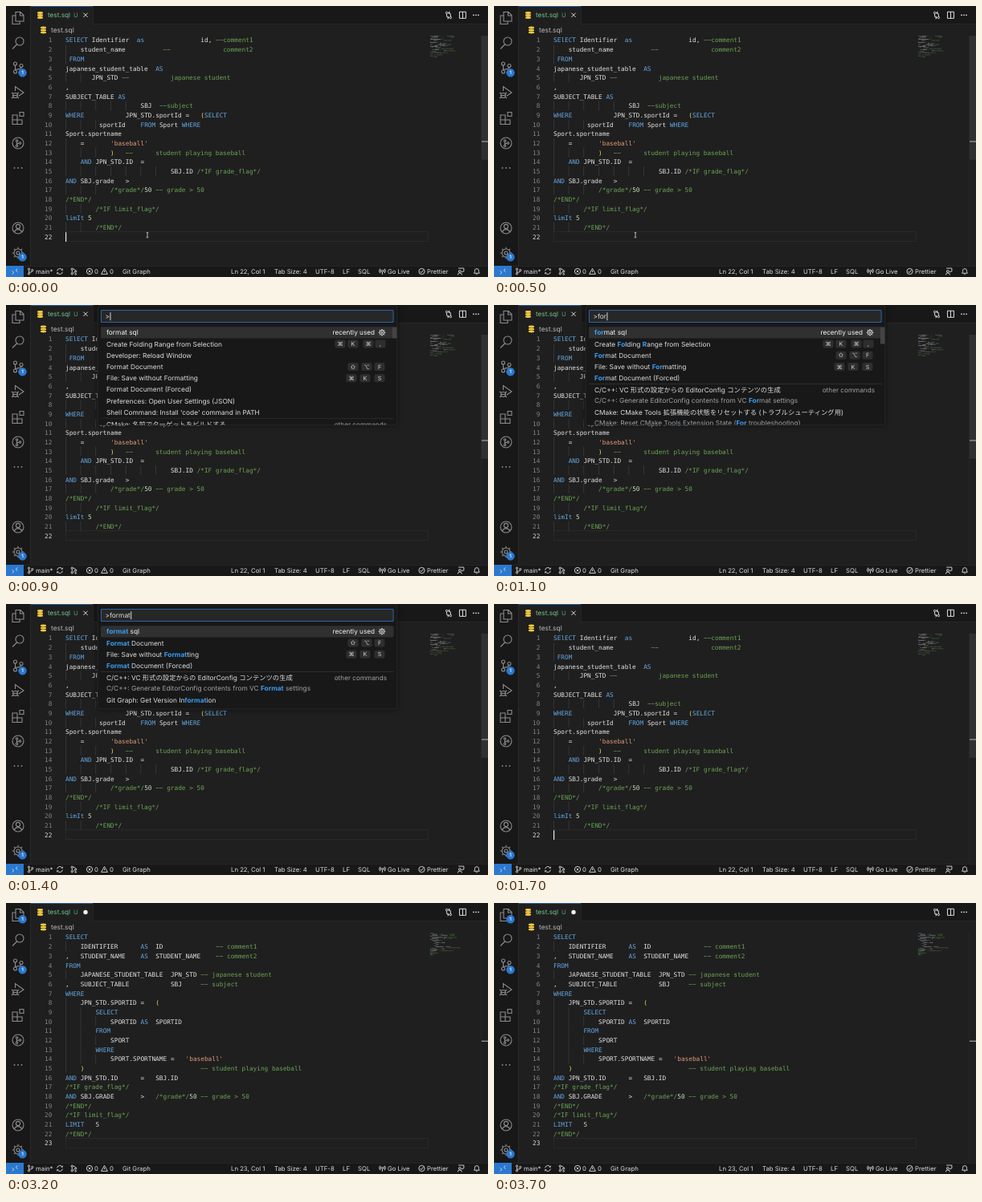
An HTML page with a canvas for the animation above (3.9 s loop, 600 by 338 pixels).

```html
<!DOCTYPE html>
<html lang="en">
<head>
<meta charset="utf-8">
<title>SQL formatter</title>
<style>
html, body { margin: 0; width: 100%; height: 100%; overflow: hidden; background: #181818; }
canvas { display: block; width: 600px; height: 338px; }
</style>
</head>
<body>
<canvas id="stage"></canvas>
<script>
const LOOP = 3900;
const UI = 'Inter, "Noto Sans CJK JP", "DejaVu Sans", sans-serif';
const MONO = '"DejaVu Sans Mono", monospace';
const COLOR = {
  bar: '#181818', editor: '#1f1f1f', line: '#2a2a2a', panel: '#181818', blue: '#2a78d0',
  text: '#dcdcdc', dim: '#8c8c8c', plain: '#e2e2e2', comment: '#6ca356', string: '#e09a78',
  keyword: '#64a8e2', bracket: '#f4d648', number: '#c8dcbc', match: '#3a9cf0',
  git: '#74c490', yellow: '#f0c840'
};
const CHAR = 4.675, ROW = 11.67, LEFT = 74, TOP = 42.7;

// "@n" moves to column n.
const expand = line => line.split(/ ?@/).reduce((out, part) => {
  const [, column, text] = part.match(/^(\d+) (.*)$/);
  return out.padEnd(+column) + text;
});
const parse = source => source.trim().split('\n').map(expand).concat('');

const messy = parse(`
SElECT Identifier @19 as @36 id, @40 --comment1
@4 student_name @26 --@42 comment2
@1 FROM
japanese_student_table @24 AS
@7 JPN_STD @15 --@28 japanese student
,
SUBJECT_TABLE AS
@20 SBJ @25 --subject
WHERE @16 JPN_STD.sportId = @36 (SELECT
@9 sportId @20 FROM Sport WHERE
Sport.sportname
@4 = @12 'baseball'
@12 ) @16 --@24 student playing baseball
@4 AND JPN_STD.ID @20 =
@28 SBJ.ID /*IF grade_flag*/
AND SBJ.grade @16 >
@12 /*grade*/50 -- grade > 50
/*END*/
@8 /*IF limit_flag*/
limIt 5
@8 /*END*/
`);

const tidy = parse(`
SELECT
@4 IDENTIFIER @20 AS @24 ID @40 -- comment1
, @4 STUDENT_NAME @20 AS @24 STUDENT_NAME @40 -- comment2
FROM
@4 JAPANESE_STUDENT_TABLE @28 JPN_STD @36 -- japanese student
, @4 SUBJECT_TABLE @28 SBJ @36 -- subject
WHERE
@4 JPN_STD.SPORTID @20 = @24 (
@8 SELECT
@12 SPORTID @20 AS @24 SPORTID
@8 FROM
@12 SPORT
@8 WHERE
@12 SPORT.SPORTNAME @28 = @32 'baseball'
@4 ) @36 -- student playing baseball
AND JPN_STD.ID @20 = @24 SBJ.ID
/*IF grade_flag*/
AND SBJ.GRADE @20 > @24 /*grade*/50 -- grade > 50
/*END*/
/*IF limit_flag*/
LIMIT @8 5
/*END*/
`);

const TOKEN = /(?<comment>--.*|\/\*.*?\*\/)|(?<string>'.*?')|(?<keyword>\b(?:select|as|from|where|and|limit)\b)|(?<bracket>[()])|(?<number>\b\d+)|(?<plain>[\w.]+|\S)/gi;
const tokens = line => [...line.matchAll(TOKEN)].map(m => ({
  text: m[0], column: m.index,
  color: COLOR[Object.keys(m.groups).find(kind => m.groups[kind])]
}));

const canvas = document.getElementById('stage');
const ctx = canvas.getContext('2d');
const ratio = window.devicePixelRatio || 1;
canvas.width = 600 * ratio;
canvas.height = 338 * ratio;

function rect(x, y, w, h, color, radius = 0) {
  ctx.fillStyle = color;
  ctx.beginPath();
  ctx.roundRect(x, y, w, h, radius);
  ctx.fill();
}

// Vertically centred on the capitals; returns the width.
function write(text, x, y, color = COLOR.text, size = 8.2, { font = UI, weight = 400, align = 'left' } = {}) {
  ctx.font = `${weight} ${size}px ${font}`;
  ctx.textAlign = align;
  ctx.fillStyle = color;
  ctx.fillText(text, x, y + size * .36);
  return ctx.measureText(text).width;
}

const ring = (x, y, r) => `M${x + r} ${y}a${r} ${r} 0 1 1 ${-2 * r} 0a${r} ${r} 0 1 1 ${2 * r} 0`;
const spokes = Array.from({ length: 8 }, (_, i) => {
  const c = Math.cos(i * Math.PI / 4), s = Math.sin(i * Math.PI / 4);
  return `M${5 * c} ${5 * s}L${7.2 * c} ${7.2 * s}`;
}).join('');
const ICON = {
  files: 'M-3-7.5h6l4 4v7.5h-10zM2.5-7.5v4.5h4.5M-3-3h-4v10.5h9v-3.5',
  search: ring(2, -2, 5) + 'M-1.5 2L-7 7.5',
  branch: ring(-3.5, -5, 2) + ring(-3.5, 5, 2) + ring(4, -2.5, 2) + 'M-3.5-3V3M4-.5C4 3-3 1-3.5 3',
  debug: 'M-3.5-2v-5.5L7 0L1 4' + ring(-3.5, 3.5, 3) + 'M-6.5 3.5h6M-8 0l2 1.5M1 0l-2 1.5M-8 7l2-1.5M1 7l-2-1.5',
  blocks: 'M-7-4h6v6h6v5.5h-12zM-7 2h6v5.5M2-7.5h5v5h-5z',
  graph: ring(0, 0, 7) + ring(-1.5, -3, 1.2) + ring(-1.5, 3.5, 1.2) + ring(2.5, 0, 1.2) + 'M-1.5-2v4M-1.5 2q0-2 3-2',
  account: ring(0, 0, 7) + ring(0, -2, 2.6) + 'M-4.5 5a4.7 4.7 0 0 1 9 0',
  gear: ring(0, 0, 2) + ring(0, 0, 5) + spokes,
  compare: ring(-4, -5, 2) + ring(4, 5, 2) + 'M-4-3v5q0 3 4 3M-2 2l2.5 3l-2.5 3M4 3v-5q0-3-4-3M2-8l-2.5 3l2.5 3',
  split: 'M-6.5-6.5h13v13h-13zM0-6.5v13',
  remote: 'M-6-1l4 3.5l-4 3.5M6-6l-4 3.5l4 3.5',
  sync: 'M-6-1a6 6 0 0 1 11-2.5M6 1a6 6 0 0 1-11 2.5M6-6v3h-3M-6 6v-3h3',
  tree: ring(-4, -5, 2) + ring(-4, 5, 2) + ring(4, 0, 2) + ring(4, 6, 1.5) + 'M-4-3v6M-2-5h3l3 3M-2 5l4-4',
  error: ring(0, 0, 6.5) + 'M-2.5-2.5l5 5M2.5-2.5l-5 5',
  warning: 'M0-6.5L7 6h-14zM0-2v4',
  antenna: ring(0, -1, 1.5) + 'M0 1v6M-3 2a4.5 4.5 0 0 1 0-6M3 2a4.5 4.5 0 0 0 0-6M-5 4a7.5 7.5 0 0 1 0-10M5 4a7.5 7.5 0 0 0 0-10',
  check: ring(0, 0, 6.5) + 'M-3.5 0l2.5 3l4.5-6',
  feedback: ring(-2, 0, 2.5) + 'M-6.5 8a4.5 4.5 0 0 1 9 0M-5-7h12v7h-2l-2 2v-2',
  bell: 'M-6 4h12l-1.5-2.5v-3a4.5 4.5 0 0 0-9 0v3zM-1.5 6a1.6 1.6 0 0 0 3 0',
  close: 'M-4-4l8 8M4-4l-8 8',
  beam: 'M-2-5q2 0 2 1.5q0-1.5 2-1.5M0-3.5v7M-2 5q2 0 2-1.5q0 1.5 2 1.5'
};

function icon(name, x, y, scale = 1, color = COLOR.text, width = 1) {
  ctx.save();
  ctx.translate(x, y);
  ctx.scale(scale, scale);
  ctx.lineWidth = width / scale;
  ctx.strokeStyle = color;
  ctx.stroke(new Path2D(ICON[name]));
  ctx.restore();
}

function dot(x, y, r, color) {
  rect(x - r, y - r, 2 * r, 2 * r, color, r);
}

function ellipsis(x, y, gap, color) {
  for (const i of [-1, 0, 1]) dot(x + i * gap, y, .9, color);
}

function badge(x, y) {
  dot(x, y, 5.2, COLOR.blue);
  write('1', x, y, '#fff', 6, { weight: 600, align: 'center' });
}

function database(x, y) {
  for (const dy of [-3, 0, 3]) {
    ctx.fillStyle = COLOR.yellow;
    ctx.beginPath();
    ctx.ellipse(x, y + dy, 3.5, 1.4, 0, 0, 7);
    ctx.fill();
    rect(x - 3.5, y + dy, 7, .8, COLOR.yellow);
  }
}

function activityBar(dirty) {
  rect(0, 0, 30, 324, COLOR.bar);
  rect(30, 0, 1, 324, COLOR.line);
  const items = { files: 15, search: 46, branch: 77, debug: 108, blocks: 140, graph: 171, account: 277, gear: 308 };
  for (const [name, y] of Object.entries(items)) icon(name, 15, y, 1, COLOR.dim, 1.1);
  ellipsis(15, 202, 4.5, COLOR.dim);
  badge(20.5, 83.2);
  badge(20.5, 313.2);
  if (dirty) badge(20.5, 20.2);
}

function tabBar(dirty) {
  rect(31, 0, 569, 22, COLOR.bar);
  rect(108, 22, 492, .8, COLOR.line);
  rect(31, 0, 77, 23, COLOR.editor);
  rect(108, 0, .8, 22, COLOR.line);
  rect(31, 0, 77, .8, COLOR.blue);
  database(42.5, 11.5);
  write('test.sql', 52, 11.3, COLOR.git, 8.2);
  write('U', 84, 11.3, '#58a078', 7.6);
  if (dirty) dot(99, 11.5, 2.7, '#f0f0f0');
  else icon('close', 99, 11.3, .65);
  icon('compare', 551, 11.5, .6);
  icon('split', 568.5, 11.3, .62);
  ellipsis(585, 11.3, 3, COLOR.text);
  database(46.5, 30);
  write('test.sql', 56, 29.8, '#b8b8b8', 8.4);
}

function statusBar(row) {
  rect(0, 324, 600, 14, COLOR.bar);
  rect(0, 324, 600, .8, COLOR.line);
  rect(0, 324, 22, 14, COLOR.blue);
  const icons = { remote: 11, branch: 30.5, sync: 67, tree: 84.5, error: 104, warning: 122.5, antenna: 468.5, check: 517.5, feedback: 566, bell: 586 };
  for (const [name, x] of Object.entries(icons)) icon(name, x, 331, .56, COLOR.text, .9);
  const labels = {
    37: 'main*', 110: '0', 129: '0', 145: 'Git Graph', 280: `Ln ${row}, Col 1`, 334: 'Tab Size: 4',
    385: 'UTF-8', 419: 'LF', 438: 'SQL', 475: 'Go Live', 524: 'Prettier'
  };
  for (const [x, label] of Object.entries(labels)) write(label, +x, 331, COLOR.text, 7.75);
}

function editor(lines, showCaret, showSlider) {
  const last = lines.length - 1;
  const caretY = TOP + last * ROW - 5.4;
  ctx.strokeStyle = '#292929';
  ctx.lineWidth = 1;
  ctx.strokeRect(LEFT + .5, Math.round(caretY) - .5, 451, 12);

  lines.forEach((line, i) => {
    const y = TOP + i * ROW;
    write(i + 1, 57.3, y, i === last ? '#d8d8d8' : '#80838a', 7.765, { font: MONO, align: 'right' });
    for (let col = 0; col < line.search(/\S|$/); col += 4) rect(LEFT + col * CHAR, y - 6, .7, ROW, '#404040');
    for (const { text, column, color } of tokens(line)) {
      // Minus signs give the long dashes of the editor's font.
      write(text.replaceAll('-', '\u2212'), LEFT + column * CHAR, y, color, 7.765, { font: MONO });
      ctx.globalAlpha = .45;
      for (const word of text.matchAll(/\S+/g))
        rect(528 + (column + word.index) * .6, 37.3 + i * 1.295, word[0].length * .6, .8, color);
      ctx.globalAlpha = 1;
    }
  });

  const total = lines.length + 23.6;
  rect(591, 37, .7, 287, COLOR.line);
  if (showSlider) rect(592, 37, 8, 287 * 24.6 / total, '#303031');
  rect(592, 36.2 + 287 * last / total, 8, 1.3, '#9a9a9a');
  if (showCaret) rect(LEFT, caretY, 1.2, ROW, '#e8e8e8');
}

const item = (text, extra = {}) => ({ text, ...extra });
const formatSql = item('format sql', { note: 'recently used' });
const folding = item('Create Folding Range from Selection', { keys: { 416: '⌘', 432: 'K', 451: '⌘', 466: ',' } });
const formatDoc = item('Format Document', { keys: { 432: '⇧', 449: '⌥', 465: 'F' } });
const saveRaw = item('File: Save without Formatting', { keys: { 430: '⌘', 447: 'K', 465: 'S' } });
const forced = item('Format Document (Forced)');
const others = { note: 'other commands', divider: true };
const editorConfig = [
  item('C/C++: VC 形式の設定からの EditorConfig コンテンツの生成', others),
  item('C/C++: Generate EditorConfig contents from VC Format settings', { detail: true })
];
const initialList = [
  formatSql, folding, item('Developer: Reload Window'), formatDoc, saveRaw, forced,
  item('Preferences: Open User Settings (JSON)'),
  item("Shell Command: Install 'code' command in PATH"),
  item('CMake: 名前でターゲットをビルドする', others)
];
const shortList = [
  formatSql, folding, formatDoc, saveRaw, forced, ...editorConfig,
  item('CMake: CMake Tools 拡張機能の状態をリセットする (トラブルシューティング用)'),
  item('CMake: Reset CMake Tools Extension State (For troubleshooting)', { detail: true })
];
const finalList = [formatSql, formatDoc, saveRaw, forced, ...editorConfig, item('Git Graph: Get Version Information')];

// Longest run of the query first, then its remaining letters one by one.
function matchedLetters(text, query) {
  const lower = text.toLowerCase(), hits = new Set();
  for (let n = query.length; n > 1; n--) {
    const start = lower.indexOf(query.slice(0, n));
    if (start < 0) continue;
    for (let i = 0; i < n; i++) hits.add(start + i);
    let at = start + n - 1;
    for (const letter of query.slice(n)) {
      at = lower.indexOf(letter, at + 1);
      if (at < 0) return new Set();
      hits.add(at);
    }
    break;
  }
  return hits;
}

function highlighted(text, query, x, y, color) {
  const hits = matchedLetters(text, query);
  for (let i = 0, end; i < text.length; i = end) {
    const hit = hits.has(i);
    for (end = i + 1; end < text.length && hits.has(end) === hit;) end++;
    x += write(text.slice(i, end), x, y, hit ? COLOR.match : color, 8.33, { weight: hit ? 700 : 400 });
  }
}

function palette(query) {
  const list = !query ? initialList : query.length < 4 ? shortList : finalList;
  const scrolls = list !== finalList;
  const bottom = scrolls ? 150 : 131;
  ctx.save();
  ctx.shadowColor = 'rgba(0, 0, 0, .6)';
  ctx.shadowBlur = 6 * ratio;
  rect(114, 0, 373, bottom, COLOR.panel, 4);
  ctx.restore();
  ctx.strokeStyle = '#2e2e2e';
  ctx.lineWidth = .7;
  ctx.beginPath();
  ctx.roundRect(114, 0, 373, bottom, 4);
  ctx.stroke();

  rect(118, 6, 364.5, 16, COLOR.blue, 1.5);
  rect(118.8, 6.8, 362.9, 14.4, '#272727', 1);
  const width = write('>' + query, 123.5, 14, COLOR.text, 8.33);
  rect(124 + width, 9.3, .9, 10, '#e8e8e8');

  ctx.save();
  ctx.beginPath();
  ctx.rect(114, 26, 373, bottom - 26.5);
  ctx.clip();
  rect(118, 27.3, 364.5, 14.2, '#303030', 2);
  list.forEach(({ text, note, keys = {}, divider, detail }, i) => {
    const rowY = 34.3 + i * 14.24;
    const y = rowY + (divider ? .4 : detail ? -.9 : 0);
    if (divider) rect(118, rowY - 7.3, 364.5, .7, '#363636');
    highlighted(text, query, 125, y, detail ? '#a0a0a0' : i ? COLOR.text : '#f4f4f4');
    if (note) write(note, i ? 474 : 459, y, i ? '#a0a0a0' : '#f4f4f4', 8.2, { align: 'right' });
    if (!i) icon('gear', 468, y, .6);
    for (const [x, key] of Object.entries(keys)) {
      rect(x - 6.5, y - 5, 13, 10, '#2e2e2e', 2);
      write(key, +x, y, '#d4d4d4', 7.2, { align: 'center' });
    }
  });
  if (scrolls) rect(481, 27.5, 5.5, query ? 21 : 14, '#444');
  ctx.restore();
}

const TYPED = ['', 'fo', 'for', 'form', 'forma', 'format'];

function draw(t) {
  const open = t >= 900 && t < 1700;
  const formatted = t >= 1800;
  const caret = t < 300 || (t >= 800 && t < 900) || (t >= 1700 && t < 2400);
  const lines = formatted ? tidy : messy;

  ctx.setTransform(ratio, 0, 0, ratio, 0, 0);
  ctx.textRendering = 'geometricPrecision';
  rect(0, 0, 600, 338, COLOR.editor);
  activityBar(formatted);
  tabBar(formatted);
  editor(lines, caret, !formatted);
  statusBar(lines.length);
  if (t < 900) icon('beam', 176, 285.7, .65, '#d0d0d0', .9);
  if (open) palette(TYPED[Math.min(5, Math.floor((t - 900) / 100))]);
}

function tick() {
  draw(performance.now() % LOOP);
  requestAnimationFrame(tick);
}
tick();
</script>
</body>
</html>
```
